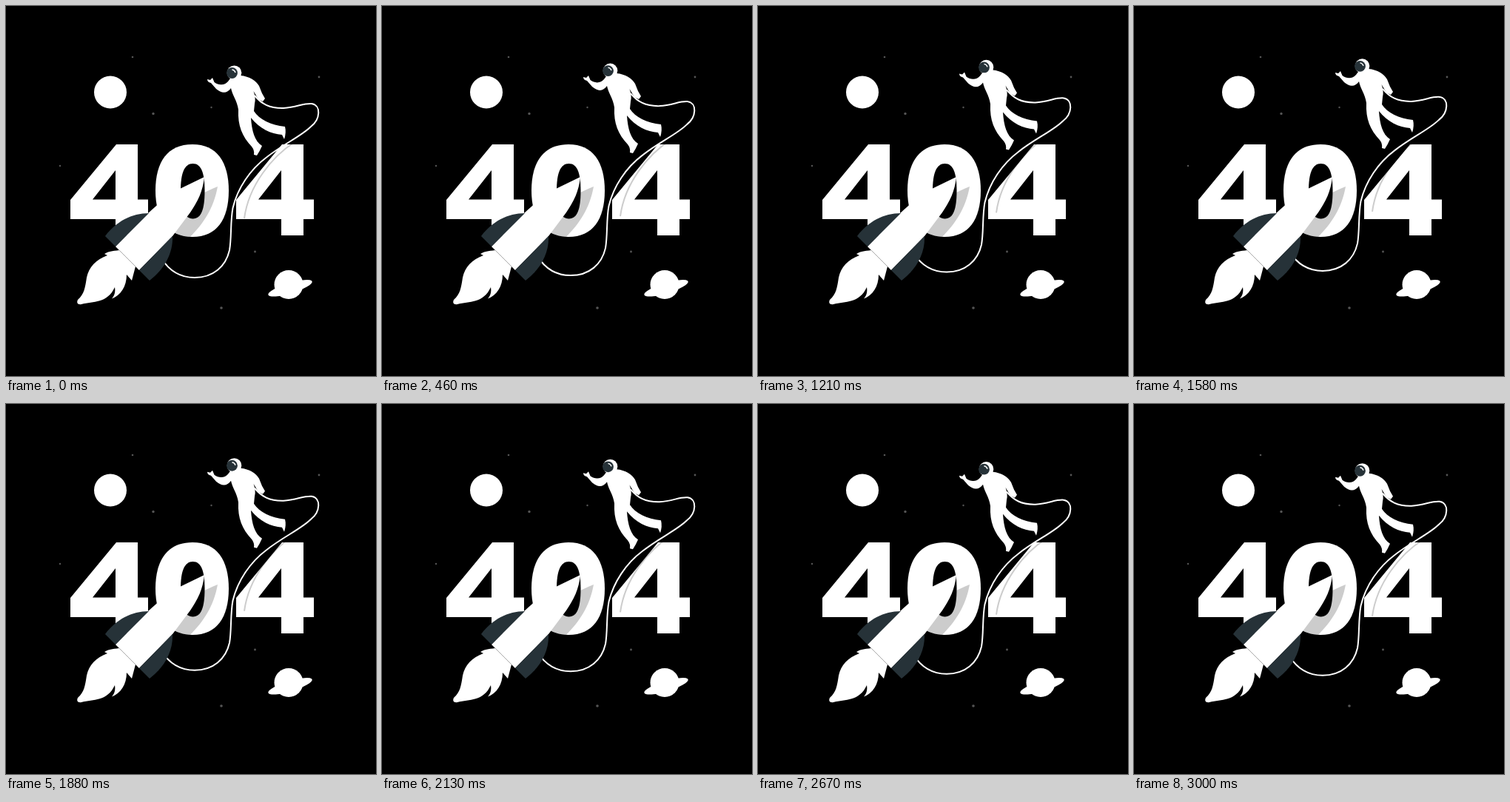
An HTML page that plays this animation: 500x500 px, repeating every 3040 ms.

```html
<!DOCTYPE html>
<html lang="en">
<head>
<meta charset="utf-8">
<title>404</title>
<style>
  html, body { margin: 0; width: 100%; height: 100%; overflow: hidden; background: #000; }
  svg { display: block; width: 100%; height: 100%; }
</style>
</head>
<body>
<svg viewBox="0 0 500 500" fill="#fff">
  <defs>
    <path id="four" fill-rule="evenodd" d="M62 0H91V74.500H105V101H91V123H61V101H0V75ZM61 35L30 74.500H61Z"/>
    <path id="zero" d="M252 187C285 187 301 211 301 249.500S285 312 252 312 202 288 202 249.500 218 187 252 187Z"/>
    <clipPath id="zeroClip"><use href="#zero"/></clipPath>
  </defs>

  <g id="stars" fill="#555"></g>
  <circle cx="141" cy="116.500" r="22"/>
  <circle cx="382" cy="376.500" r="19.500"/>
  <ellipse cx="384" cy="381.300" rx="31" ry="7" transform="rotate(-17 384 381.300)"/>

  <use href="#four" x="87" y="187"/>
  <use href="#zero"/>
  <path fill="#000" d="M252.500 213C264 213 268.500 226 268.500 250S264 287.500 252.500 287.500 236 274 236 250 241 213 252.500 213Z"/>
  <use href="#four" x="311" y="187"/>

  <g class="floating" fill="none">
    <path stroke="#000" stroke-opacity=".2" stroke-width="2" d="M390 184C360 203 328 242 322 287"/>
    <path stroke="#fff" stroke-width="2" d="M336 121C345 132 356 138.500 375 138C393 137 402 131 413 132C426 134 425 153 412 163C399 176 374 187 352 204.500C330 221 313 246 306.500 273C303 292 305 313 302 330C297 352 280 367 255 367C235 367 220 357 210 341"/>
  </g>

  <!-- rocket -->
  <path clip-path="url(#zeroClip)" fill-opacity=".2" fill="#000" d="M286 244C271 250 257 257 248 267L212 305L238 322C260 303 280 279 286 244Z"/>
  <path d="M153 330C143 331 138 332 133 335L137 337C121 343 112 353 109 367C107 380 106 389 97 397C95 401 97 404 102 403C118 399 137 402 147 380C148 386 147 391 143 395.500C155 391 163 379 163 363L170 371L175 352Z"/>
  <path d="M148 325L192 280C208 266 221 253 235 247L268 231C266 251 259 264 249 279L225 311L180 357Z"/>
  <path fill="#263238" d="M134 311C149 291 170 280 193 280L148 325ZM180 357L225 311C226 334 214 356 194 371Z"/>
  <path fill="none" stroke="#999" stroke-width=".6" d="M148 325L180 357"/>

  <!-- astronaut -->
  <g class="floating">
    <path d="M303 98L317 94C329 95 338 101 342 108L346 118L350 125L347 129L341 126L334.500 115Q338 125 336 132L335 142C342 153 358 161 377 163Q379 171 376 180L373 174C358 173 343 166 331 151C332 168 336 183 346 189Q343 196 339 202L335 201Q336 195 332 190C319 176 313 162 314 140C312 127 306 121 304 111C299 118 292 119 284 112L277 104Q272 103 272 99L276 100L279 97L281.500 103C288 108 296 107 300 102Z"/>
    <circle cx="308.500" cy="90.200" r="9.800"/>
    <circle cx="305.500" cy="90.500" r="7.400" fill="#263238"/>
    <path fill="none" stroke="#fff" stroke-width="1.400" d="M305.500 86Q309 86.500 310 90"/>
  </g>
</svg>
<script>
  const LOOP = 3040, RISE = 9.5;
  const stars = [[171, 69, 1.3], [199, 145.5, 1.7], [277.5, 137, 1.2], [423, 96, 1.4],
                 [73, 216, 1.2], [336.5, 332, 1.4], [291, 408, 1.8]];
  document.getElementById('stars').innerHTML = stars
    .map(([x, y, r]) => `<circle cx="${x}" cy="${y}" r="${r}"/>`).join('');

  const floating = document.querySelectorAll('.floating');
  const start = performance.now();

  function draw(now) {
    const phase = Math.max(0, now - start) % LOOP / LOOP;
    const lift = RISE * (1 - Math.abs(1 - 2 * phase));
    floating.forEach(part => part.setAttribute('transform', `translate(0 ${-lift})`));
    requestAnimationFrame(draw);
  }
  draw(start);
</script>
</body>
</html>
```
